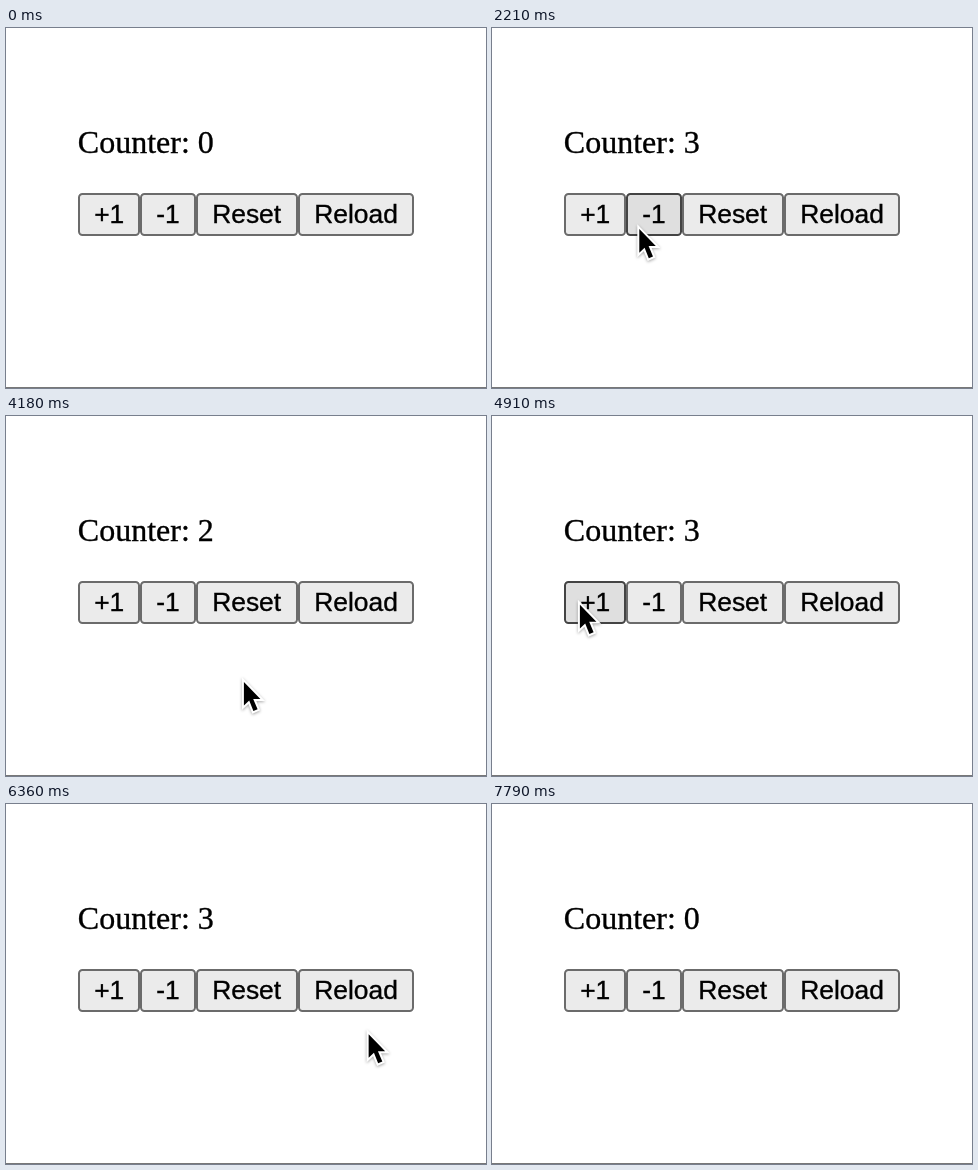
Recreate the animation shown at these times as an HTML page. Size 480 by 360 pixels, loop 8850 ms.

```html
<!DOCTYPE html>
<html lang="en">
<head>
<meta charset="utf-8">
<title>Counter</title>
<style>
  html, body { margin: 0; width: 100%; height: 100%; overflow: hidden; background: #fff; }
  svg { display: block; width: 480px; height: 360px; }
  text { stroke: #000; stroke-width: .35px; }
  .label { font: 32px "Liberation Serif", Times, serif; }
  .button text { font: 26.4px "Liberation Sans", Arial, sans-serif; }
  .button rect { fill: #ebebeb; stroke: #6b6b6b; stroke-width: 2; }
  .button.hover rect { fill: #dfdfdf; stroke: #444; }
  .button.active rect { fill: #f2f2f2; stroke: #838383; }
  #cursor { filter: drop-shadow(0 1.5px 1.5px rgba(0, 0, 0, .35)); }
</style>
</head>
<body>
<svg viewBox="0 0 480 360">
  <rect width="480" height="360" fill="#fff"/>
  <text class="label" x="71.8" y="125">Counter: <tspan id="count">0</tspan></text>
  <g id="buttons"></g>
  <rect y="359" width="480" height="1" fill="#787878"/>
  <g id="cursor">
    <path d="M.9 3.8V27.4L6.2 22.4L10.4 33L14.6 31.2L10.2 20.8H17.4Z"
      fill="#000" stroke="#fff" stroke-width="4" paint-order="stroke"/>
  </g>
</svg>
<script>
const LOOP = 8850;
const HOLD = 150;
const TOP = 165, BOTTOM = 208, REST = 185;
const PAD = 16.2;

const BUTTONS = [
  { label: '+1', width: 62, apply: n => n + 1 },
  { label: '-1', width: 56, apply: n => n - 1 },
  { label: 'Reset', width: 102, apply: () => 0 },
  { label: 'Reload', width: 116, apply: n => n },
];

// Each move ends at x, y after sagging by dip; clicks are release times on a button.
const ENTRY = { x: 125, y: 372 };
const MOVES = [
  { leave: 330, arrive: 900, x: 101, y: REST, dip: 0, button: 0, clicks: [1180, 1420, 1730] },
  { leave: 1850, arrive: 2390, x: 157, y: REST, dip: 22, button: 1, clicks: [2730] },
  { leave: 2850, arrive: 3450, x: 350, y: REST, dip: 56, button: 3, clicks: [3850] },
  { leave: 3850, arrive: 4730, x: 87, y: REST, dip: 79, button: 0, clicks: [4910] },
  { leave: 5150, arrive: 5970, x: 384, y: REST, dip: 93, button: 3, clicks: [6300] },
  { leave: 6180, arrive: 7060, x: 266, y: REST, dip: 74, button: 2, clicks: [7240] },
  { leave: 7580, arrive: 7790, x: 262, y: 372, dip: 0, clicks: [] },
];
const CLICKS = MOVES.flatMap(({ button, clicks }) =>
  clicks.map(time => ({ time, apply: BUTTONS[button].apply })));

const cursor = document.getElementById('cursor');
const count = document.getElementById('count');
const row = document.getElementById('buttons');

function add(parent, tag, attrs) {
  const el = document.createElementNS('http://www.w3.org/2000/svg', tag);
  for (const key in attrs) el.setAttribute(key, attrs[key]);
  return parent.appendChild(el);
}

let edge = 72;
for (const button of BUTTONS) {
  button.left = edge;
  button.el = add(row, 'g', { class: 'button' });
  add(button.el, 'rect', {
    x: edge + 1, y: TOP + 1, width: button.width - 2, height: BOTTOM - TOP - 2, rx: 3.5,
  });
  add(button.el, 'text', { x: edge + PAD, y: 195 }).textContent = button.label;
  edge += button.width;
}

const mix = (a, b, s) => a + (b - a) * s;

// Ease in and out, with the faster half first.
function ease(u) {
  const v = u ** 0.81;
  return v * v * (3 - 2 * v);
}

function pointerAt(t) {
  if (t < MOVES[0].leave || t >= MOVES[MOVES.length - 1].arrive) return null;
  const i = MOVES.filter(m => t >= m.leave).length - 1;
  const from = MOVES[i - 1] || ENTRY, to = MOVES[i];
  const s = ease(Math.min(1, (t - to.leave) / (to.arrive - to.leave)));
  return {
    x: mix(from.x, to.x, s),
    y: mix(from.y, to.y, s) + to.dip * Math.sin(Math.PI * s),
  };
}

function render(t) {
  const tip = pointerAt(t);
  const pressed = CLICKS.some(c => t >= c.time - HOLD && t < c.time);

  count.textContent = CLICKS.filter(c => t >= c.time).reduce((n, c) => c.apply(n), 0);
  cursor.style.display = tip ? '' : 'none';
  if (tip) cursor.setAttribute('transform', `translate(${tip.x.toFixed(2)} ${tip.y.toFixed(2)})`);

  for (const { el, left, width } of BUTTONS) {
    const over = !!tip && tip.x >= left && tip.x < left + width && tip.y >= TOP && tip.y < BOTTOM;
    el.classList.toggle('hover', over);
    el.classList.toggle('active', over && pressed);
  }
}

const start = performance.now();
function tick() {
  render((performance.now() - start) % LOOP);
  requestAnimationFrame(tick);
}
tick();
</script>
</body>
</html>
```
